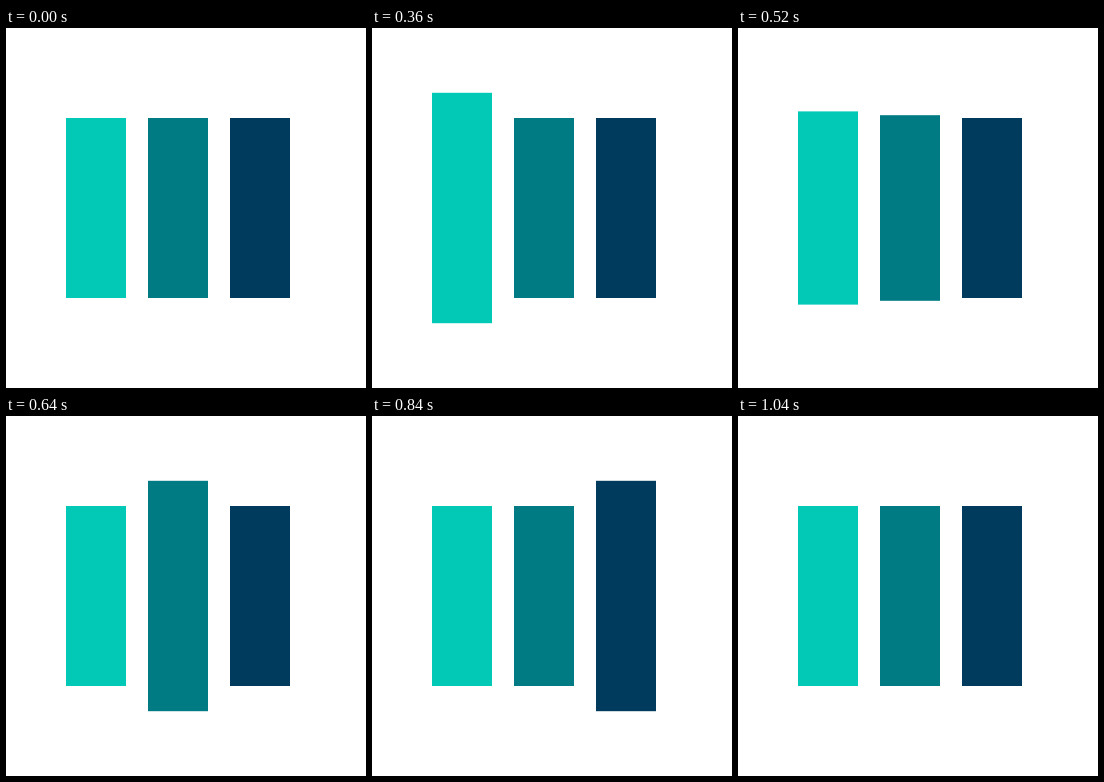
Recreate the animation shown at these times as an HTML page with a canvas. Size 360x360 px, loop 1400 ms.

```html
<!DOCTYPE html>
<html lang="en">
<head>
<meta charset="utf-8">
<title>Pulsing bars</title>
<style>
  html, body { margin: 0; width: 100%; height: 100%; overflow: hidden; background: #fff; }
  canvas { display: block; width: 360px; height: 360px; }
</style>
</head>
<body>
<canvas id="stage" width="360" height="360"></canvas>
<script>
const ctx = document.getElementById('stage').getContext('2d');
const LOOP = 1400, STEP = 40;
const TOP = 90, HEIGHT = 180, WIDTH = 60;

const bars = [
  { x: 60, color: '#02c9b5', start: 240 },
  { x: 142, color: '#007a83', start: 520 },
  { x: 224, color: '#003a5d', start: 720 }
];

// Growth at each end of a bar: [ms since start, px]
const pulse = [[0, 2.8], [120, 25.2], [160, 33.6], [280, 6.6], [320, 0]];

function growth(t) {
  if (t < 0) return 0;
  for (let i = 1; i < pulse.length; i++) {
    const [t0, a] = pulse[i - 1], [t1, b] = pulse[i];
    if (t <= t1) return a + (b - a) * (t - t0) / (t1 - t0);
  }
  return 0;
}

function draw(ms) {
  const t = Math.floor((ms % LOOP) / STEP) * STEP;
  ctx.fillStyle = '#fff';
  ctx.fillRect(0, 0, 360, 360);
  for (const bar of bars) {
    const g = growth(t - bar.start);
    ctx.fillStyle = bar.color;
    ctx.fillRect(bar.x, TOP - g, WIDTH, HEIGHT + 2 * g);
  }
}

const begin = performance.now();
function tick() {
  draw(performance.now() - begin);
  requestAnimationFrame(tick);
}
tick();
</script>
</body>
</html>
```
